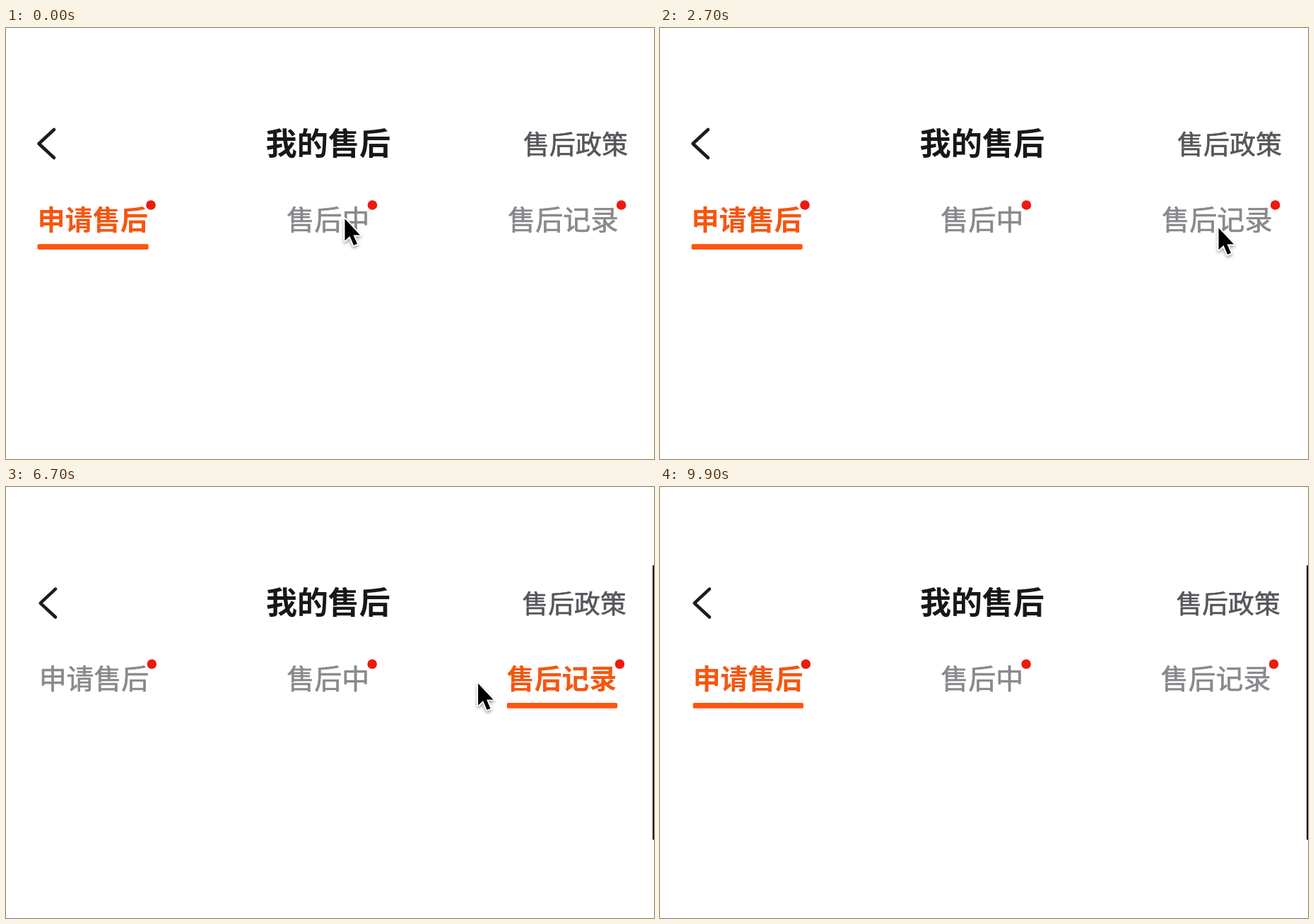
These frames come from a looping animation (917x611 px, 10 s). An HTML page:

```html
<!DOCTYPE html>
<html lang="zh-CN">
<head>
<meta charset="utf-8">
<style>
  html, body { margin: 0; width: 100%; height: 100%; overflow: hidden; background: #fff; }
  svg { display: block; width: 917px; height: 611px; }
  text { font-family: "Noto Sans CJK SC", "Noto Sans CJK", "Noto Sans", sans-serif; }
  .title { font-size: 44.2px; font-weight: 700; fill: #18181a; }
  .policy { font-size: 37px; fill: #55565a; stroke: #55565a; stroke-width: .6px; }
  .tab { font-size: 39.1px; fill: #88898c; stroke: #88898c; stroke-width: .7px; }
  .tab.active { font-weight: 700; fill: #f6560f; stroke: none; }
  .bar { fill: #ff550d; }
  .dot { fill: #ee1a0c; }
</style>
</head>
<body>
<svg viewBox="0 0 917 611">
  <defs>
    <filter id="shadow" x="-50%" y="-50%" width="200%" height="200%">
      <feDropShadow dx="0" dy="2.5" stdDeviation="2" flood-color="#000" flood-opacity=".4"/>
    </filter>
  </defs>
  <g id="page">
    <path d="M68 144L46.5 164L68 184" fill="none" stroke="#1c1c1e" stroke-width="4.6" stroke-linecap="round" stroke-linejoin="round"/>
    <text class="title" x="367.5" y="180">我的售后</text>
    <text class="policy" x="732" y="179">售后政策</text>
    <g id="tabs"></g>
  </g>
  <rect id="edge" x="915" y="111" width="2" height="389" fill="#1a1a1c"/>
  <path id="cursor" d="M1.5 2.5v31l7 -6.5l5.5 13l5 -2l-5.5 -12.5h9.5Z" fill="#000" stroke="#fff" stroke-width="3.4" stroke-linejoin="round" paint-order="stroke" filter="url(#shadow)"/>
</svg>
<script>
const LOOP = 10000, STEP = 100, SLIDE = 300, SHIFT_AT = 5000;
const LINGER = 300, EARLY = 150; // cursor waits after and before each click
const CHAR = 39.3;

// x: left edge, aim: where the cursor tip clicks
const tabs = [
  { label: '申请售后', x: 44.5, aim: [139, 272] },
  { label: '售后中', x: 397.3, aim: [478, 268] },
  { label: '售后记录', x: 710.2, aim: [789, 281] },
];

// [time, selected tab]
const clicks = [
  [-2 * SLIDE, 0], [50, 1], [1050, 2], [1850, 0], [2850, 2], [3850, 1], [4450, 0],
  [5250, 1], [6250, 2], [7050, 1], [7750, 0], [8750, 2], [9550, 0],
];

const byId = id => document.getElementById(id);
const clamp = v => Math.min(1, Math.max(0, v));
const smooth = (t, from, to) => {
  const k = clamp((t - from) / (to - from));
  return k * k * (3 - 2 * k);
};
const mix = (a, b, k) => a + (b - a) * k;

function add(tag, attrs, text = '') {
  const node = document.createElementNS('http://www.w3.org/2000/svg', tag);
  for (const name in attrs) node.setAttribute(name, attrs[name]);
  node.textContent = text;
  return byId('tabs').appendChild(node);
}

for (const tab of tabs) {
  tab.width = tab.label.length * CHAR;
  tab.text = add('text', { class: 'tab', x: tab.x, y: 286 }, tab.label);
  tab.bar = add('rect', { class: 'bar', y: 306.3, height: 7.8, rx: 2 });
  add('circle', { class: 'dot', cx: tab.x + tab.width + 3.3, cy: 251, r: 6.8 });
}

function setBar(tab, portion, fromRight) {
  const width = tab.width * portion;
  tab.bar.setAttribute('x', fromRight ? tab.x + tab.width - width : tab.x);
  tab.bar.setAttribute('width', width);
}

function drawTabs(t, last) {
  const [at, current] = clicks[last];
  const previous = last ? clicks[last - 1][1] : current;
  const k = smooth(t, at, at + SLIDE);
  const rightward = current > previous;
  tabs.forEach((tab, i) => {
    tab.text.classList.toggle('active', i === current);
    if (i === current) setBar(tab, k, !rightward);
    else setBar(tab, i === previous ? 1 - k : 0, rightward);
  });
}

function drawCursor(t, last) {
  const [at, from] = clicks[last];
  const [nextAt, to] = clicks[last + 1] || [LOOP, from];
  const k = smooth(t, at + LINGER, nextAt - EARLY);
  const [x, y] = tabs[from].aim.map((v, i) => mix(v, tabs[to].aim[i], k));
  const bow = from - to === 2 ? 200 * k * (1 - k) : 0;
  const exit = 145 * smooth(t, LOOP - 450, LOOP - EARLY);
  byId('cursor').setAttribute('transform', `translate(${x} ${y - bow + exit})`);
  byId('cursor').style.display = t < LOOP - EARLY ? '' : 'none';
}

function render(time) {
  const t = Math.floor((time % LOOP) / STEP) * STEP;
  const shifted = t >= SHIFT_AT;
  const last = clicks.findLastIndex(([at]) => at <= t);
  byId('page').setAttribute('transform', shifted ? 'translate(456 270) scale(.9947) translate(-456 -270)' : '');
  byId('edge').style.display = shifted ? '' : 'none';
  drawTabs(t, last);
  drawCursor(t, last);
}

const start = performance.now();
function tick() {
  render(performance.now() - start);
  requestAnimationFrame(tick);
}
tick();
</script>
</body>
</html>
```
